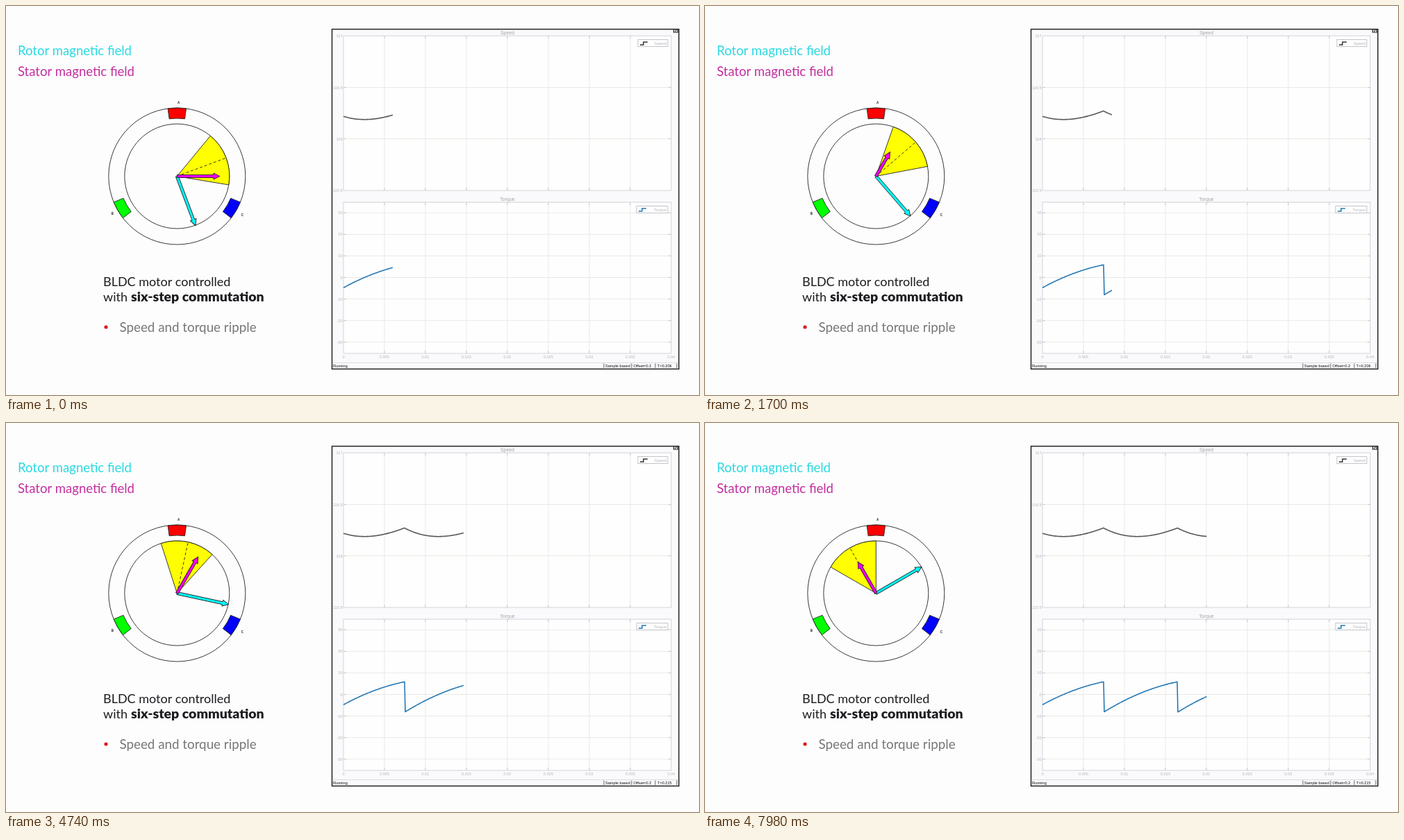
Animation, 998 px wide and 561 px high, one loop 8 s. Source, as an HTML page with a canvas:

```html
<!DOCTYPE html>
<html>
<head>
<meta charset="utf-8">
<style>
  html, body { margin: 0; width: 100%; height: 100%; overflow: hidden; background: #fdfdfd; }
  canvas { display: block; }
</style>
</head>
<body>
<canvas id="stage" width="998" height="561"></canvas>
<script>
const ctx = document.getElementById('stage').getContext('2d');
const LOOP = 8000;
const CENTER = { x: 246.3, y: 245.5 }, INNER = 75.5, OUTER = 98.5;
const PLOT = { left: 486, right: 958 };
const SPEED = { top: 43, bottom: 266 }, TORQUE = { top: 283, bottom: 501 };
const GRID_STEP = 59;

// [step, angle of the commutation sector in degrees, x where the traces end]
const KEYS = [
  [0, 20.5, 557], [19, 32.5, 571.5], [37, 40.8, 586], [67, 60, 621],
  [101, 77.8, 659], [125, 92.9, 682], [171, 120, 722.5]
];

// The picture advances in groups of three steps, held for 100, 20 and 20 ms.
function stepAt(time) {
  if (time < 20) return 0;
  const t = time - 20, rest = t % 140;
  return Math.floor(t / 140) * 3 + (rest < 100 ? 1 : rest < 120 ? 2 : 3);
}

function poseAt(step) {
  const i = Math.max(1, KEYS.findIndex(key => key[0] >= step));
  const a = KEYS[i - 1], b = KEYS[i];
  const f = (step - a[0]) / (b[0] - a[0]);
  return { angle: a[1] + (b[1] - a[1]) * f, end: a[2] + (b[2] - a[2]) * f };
}

const rad = degrees => degrees * Math.PI / 180;
const polar = (degrees, r) => [CENTER.x + r * Math.cos(rad(degrees)), CENTER.y - r * Math.sin(rad(degrees))];

function text(str, x, y, size, color, { align = 'left', weight = 400, family = 'Lato' } = {}) {
  ctx.font = `${weight} ${size}px ${family}, sans-serif`;
  ctx.textAlign = align;
  ctx.fillStyle = color;
  ctx.fillText(str, x, y);
}

function line(points, color, width = 1) {
  ctx.beginPath();
  points.forEach(p => ctx.lineTo(...p));
  ctx.strokeStyle = color;
  ctx.lineWidth = width;
  ctx.stroke();
}

function box(x, y, w, h, fill, stroke, width = 1) {
  ctx.fillStyle = fill;
  ctx.fillRect(x, y, w, h);
  ctx.strokeStyle = stroke;
  ctx.lineWidth = width;
  ctx.strokeRect(x, y, w, h);
}

function paint(fill, width = 0.9) {
  if (fill) {
    ctx.fillStyle = fill;
    ctx.fill();
  }
  ctx.strokeStyle = '#222';
  ctx.lineWidth = width;
  ctx.stroke();
}

function circle(r) {
  ctx.beginPath();
  ctx.arc(CENTER.x, CENTER.y, r, 0, 2 * Math.PI);
  paint();
}

function coil(degrees, color) {
  const from = rad(-degrees - 7.7), to = rad(-degrees + 7.7);
  ctx.beginPath();
  ctx.arc(CENTER.x, CENTER.y, OUTER, from, to);
  ctx.arc(CENTER.x, CENTER.y, 83.5, to, from, true);
  ctx.closePath();
  paint(color);
}

function arrow(degrees, length, color) {
  ctx.save();
  ctx.translate(CENTER.x, CENTER.y);
  ctx.rotate(-rad(degrees));
  const neck = length - 9;
  ctx.beginPath();
  [[0, -2], [neck, -2], [neck, -4.5], [length, 0], [neck, 4.5], [neck, 2], [0, 2]]
    .forEach(p => ctx.lineTo(...p));
  ctx.closePath();
  paint(color);
  ctx.restore();
}

function drawMotor(angle) {
  circle(OUTER);
  coil(90, '#f00');
  coil(210, '#0f0');
  coil(330, '#00f');
  const label = { align: 'center', weight: 700, family: 'Liberation Sans' };
  text('A', 248.5, 140.5, 4.5, '#222', label);
  text('B', 153.3, 300.8, 4.5, '#222', label);
  text('C', 340.3, 302.6, 4.5, '#222', label);
  circle(INNER);

  ctx.beginPath();
  ctx.moveTo(CENTER.x, CENTER.y);
  ctx.arc(CENTER.x, CENTER.y, INNER, rad(-angle - 30), rad(-angle + 30));
  ctx.closePath();
  paint('#ff0');
  ctx.setLineDash([4, 3]);
  line([polar(angle, 0), polar(angle, INNER)], '#222', 0.9);
  ctx.setLineDash([]);

  arrow(angle - 90, 76, '#0ff');
  const sector = Math.floor((angle + 30) / 60), past = (angle + 30) % 60;
  arrow(sector * 60, 32.2 + 0.79 * past - 0.0041 * past * past, '#f0f');
}

function drawCaptions() {
  text('Rotor magnetic field', 17, 71, 18.5, '#2bd9e3');
  text('Stator magnetic field', 17, 101, 18.5, '#c32f9f');
  text('BLDC motor controlled', 140, 403.5, 18, '#1c1c20');
  text('with', 140, 426, 18, '#1c1c20');
  text('six-step commutation', 180, 426, 19.5, '#1c1c20', { weight: 900 });
  text('Speed and torque ripple', 163.5, 470, 18.8, '#77777b');
  ctx.beginPath();
  ctx.arc(144, 463, 2.6, 0, 2 * Math.PI);
  ctx.fillStyle = '#e01b22';
  ctx.fill();
}

const small = { family: 'Liberation Sans' };

function drawAxes(area, title, ticks, legendX, legendColor) {
  const { top, bottom } = area;
  box(PLOT.left, top, PLOT.right - PLOT.left, bottom - top, '#fefefe', '#d2d2da');
  for (let x = PLOT.left + GRID_STEP; x < PLOT.right; x += GRID_STEP) {
    line([[x, top], [x, bottom]], '#e9e9ea');
    line([[x, top], [x, top + 4]], '#c8c8ce');
    line([[x, bottom - 4], [x, bottom]], '#c8c8ce');
  }
  for (const [label, y] of ticks) {
    if (y > top && y < bottom) {
      line([[PLOT.left, y], [PLOT.right, y]], '#e9e9e5');
      line([[PLOT.left, y], [PLOT.left + 4, y]], '#c8c8ce');
      line([[PLOT.right - 4, y], [PLOT.right, y]], '#c8c8ce');
    }
    text(label, 484.5, y + 2, 5.6, '#b4b4b8', { ...small, align: 'right' });
  }
  text(title, 722, top - 2.5, 7, '#a5a5a9', { ...small, align: 'center' });

  const y = top + 5.5;
  box(legendX, y, 953 - legendX, 10, '#fefefe', '#c4c4ca');
  line([[legendX + 3, y + 7.5], [legendX + 8, y + 7.5], [legendX + 8, y + 3.5], [legendX + 14, y + 3.5]], legendColor, 1.5);
  text(title, 951, y + 7.2, 6, '#b8b8bc', { ...small, align: 'right' });
}

function drawScope(time) {
  box(469.5, 33.5, 499.5, 490, '#fafafc', '#222', 1.5);
  box(961.5, 34, 6, 4, '#eee', '#222');
  line([[963, 37], [966, 35]], '#222');

  drawAxes(SPEED, 'Speed', [['117', 43], ['116.5', 117.5], ['116', 191.5], ['115.5', 266]], 910, '#333');
  const torqueTicks = [30, 20, 10, 0, -10, -20, -30].map(v => [String(v), 391.5 - v * 3.11]);
  drawAxes(TORQUE, 'Torque', torqueTicks, 908, '#1f78b4');
  for (let i = 0; i <= 8; i++) {
    text(String(i * 5 / 1000), PLOT.left + i * GRID_STEP, 508, 5.6, '#b4b4b8', { ...small, align: 'center' });
  }

  line([[470, 514.5], [968, 514.5]], '#dddde0');
  const clock = time < 2400 ? '0.206' : time < 4300 ? '0.211' : '0.215';
  text('Running', 471, 521, 5.6, '#111', small);
  text('Sample based', 863, 521, 5.6, '#111', small);
  text('Offset=0.2', 903.5, 521, 5.6, '#111', small);
  text('T=' + clock, 938, 521, 5.6, '#111', small);
  [861, 901, 935, 966].forEach(x => line([[x, 515.5], [x, 522]], '#666'));
}

function trace(end, curve, color) {
  const points = [];
  const add = x => points.push([x, curve(((x - 467.7) / 106.5) % 1)]);
  for (let x = PLOT.left; x < end; x++) add(x);
  add(end);
  ctx.lineJoin = 'round';
  line(points, color, 1.6);
  ctx.lineJoin = 'miter';
}

// u runs from 0 to 1 between commutations; speed follows the integral of torque.
const torqueY = u => 417 - 66 * u + 22.2 * u * u;
const speedY = u => 151.5 - 2.23 * (-25.5 * u + 33 * u * u - 7.4 * u ** 3);

function draw(now) {
  const time = now % LOOP;
  const { angle, end } = poseAt(stepAt(time));
  ctx.fillStyle = '#fdfdfd';
  ctx.fillRect(0, 0, 998, 561);
  drawCaptions();
  drawMotor(angle);
  drawScope(time);
  trace(end, speedY, '#58585a');
  trace(end, torqueY, '#2678b4');
  requestAnimationFrame(draw);
}
requestAnimationFrame(draw);
</script>
</body>
</html>
```
